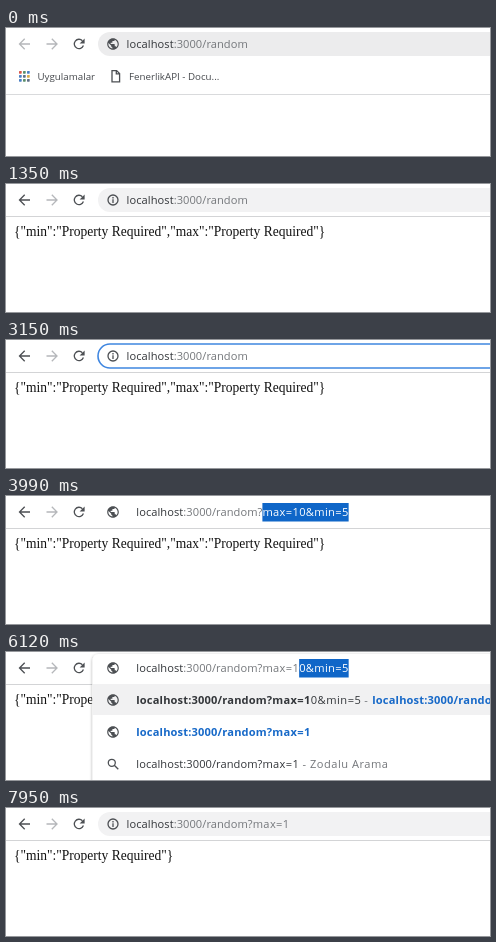
An HTML page for the animation above (8 s loop, 484 by 128 pixels).

```html
<!DOCTYPE html>
<html lang="tr">
<head>
<meta charset="utf-8">
<title>Address bar</title>
<style>
html, body { margin: 0; width: 100%; height: 100%; overflow: hidden; background: #fff; }
svg { display: block; }
text { white-space: pre; font: 11.1px "Open Sans", "Noto Sans", sans-serif; letter-spacing: .06px; fill: #33363a; }
.page { font: 13.52px "Liberation Serif", "Times New Roman", serif; letter-spacing: 0; fill: #111; }
.mark { font-size: 9.75px; letter-spacing: 0; fill: #44474b; }
.bold { font-weight: 700; letter-spacing: .16px; }
.query { letter-spacing: .35px; }
.rest { font-weight: 400; letter-spacing: .5px; }
.blue { fill: #1769c8; }
.grey { fill: #74777b; }
.line { fill: none; stroke: #4c4f53; stroke-width: 1.3; }
.off { stroke: #b5b7ba; }
.icon { fill: #4c4f53; }
</style>
</head>
<body>
<svg width="484" height="128" viewBox="0 0 484 128">
  <defs>
    <filter id="shadow" x="-5%" y="-10%" width="110%" height="120%">
      <feDropShadow dx="0" dy="1" stdDeviation="1.6" flood-color="#000" flood-opacity=".4"/>
    </filter>
    <path id="globe" class="icon" transform="scale(.58) translate(-12 -12)" d="M12 2C6.48 2 2 6.48 2 12s4.48 10 10 10 10-4.48 10-10S17.52 2 12 2zm-1 17.93c-3.95-.49-7-3.85-7-7.93 0-.62.08-1.21.21-1.79L9 15v1c0 1.1.9 2 2 2v1.93zm6.9-2.54c-.26-.81-1-1.39-1.9-1.39h-1v-3c0-.55-.45-1-1-1H8v-2h2c.55 0 1-.45 1-1V7h2c1.1 0 2-.9 2-2v-.41c2.93 1.19 5 4.06 5 7.41 0 2.08-.8 3.97-2.1 5.39z"/>
  </defs>
  <rect width="484" height="128" fill="#fff"/>

  <g id="bookmarks">
    <g id="apps"></g>
    <text class="mark" x="31.5" y="51.8">Uygulamalar</text>
    <path class="line" d="M106 42.6h4.6l3 3v8.3H106zM110.3 42.8v3.1h3.2"/>
    <text class="mark" x="123" y="51.8">FenerlikAPI - Docu...</text>
    <rect y="66" width="484" height="1" fill="#d9dadc"/>
  </g>

  <g id="loaded">
    <rect y="32" width="484" height="1" fill="#d3d4d6"/>
    <text id="body" class="page" x="8" y="52.4"></text>
  </g>

  <path id="back" class="line" d="M24 16H13.7M18.7 10.8l-5.2 5.2 5.2 5.2"/>
  <path class="line off" d="M40.5 16h10.3M45.8 10.8l5.2 5.2-5.2 5.2"/>
  <path class="line" d="M77.4 17.6A4.7 4.7 0 1 1 76.4 12.7"/>
  <path class="icon" d="M78.6 10.4v5h-5z"/>

  <rect id="pill" x="92" y="4" width="420" height="24" rx="12"/>

  <g id="menu">
    <rect x="86.5" y="2" width="430" height="150" rx="6" fill="#fff" filter="url(#shadow)"/>
    <rect x="86.5" y="32" width="400" height="31" fill="#f1f1f2"/>
    <use href="#globe" x="107" y="48"/>
    <use href="#globe" x="107" y="80"/>
    <g id="match">
      <text x="130.3" y="52"><tspan class="bold">localhost:3000/random?</tspan><tspan id="hit" class="bold query"></tspan><tspan id="miss" class="rest"></tspan></text>
      <text class="grey" x="358.3" y="52">-</text>
      <text class="bold blue" x="366.3" y="52">localhost:3000/random?max=10&amp;min=5</text>
    </g>
    <g id="typedRow">
      <text class="bold blue" x="130.3" y="84">localhost:3000/random?<tspan id="typedUrl" class="query"></tspan></text>
    </g>
    <circle class="line" cx="105.8" cy="110.8" r="3.5"/>
    <path class="line" d="M108.3 113.3l4 4"/>
    <text x="130.3" y="116">localhost:3000/random?<tspan id="search" class="query"></tspan><tspan class="grey rest"> - Zodalu Arama</tspan></text>
  </g>

  <use id="site" href="#globe" x="107" y="16"/>
  <g id="info">
    <circle class="line" cx="107" cy="16" r="5"/>
    <path class="line" d="M107 12.9v1.5M107 15.2v3.8"/>
  </g>

  <g id="address">
    <rect id="selection" y="7" height="18.5" fill="#0f66c8"/>
    <text id="url" y="20">localhost<tspan class="grey">:3000/random</tspan><tspan id="mark" class="grey"></tspan><tspan id="typed" class="grey query"></tspan><tspan id="picked" class="query" fill="#fff"></tspan></text>
    <rect id="caret" y="8" width="1" height="16" fill="#222"/>
  </g>
</svg>
<script>
const LOOP = 8000;
const BASE = "localhost:3000/random?";
const QUERY = "max=10&min=5";
const KEYS = [4830, 5400, 5460, 5700, 6090];
const T = { hoverEnd: 750, load: 1200, info: 1350, focus: 2550, ring: 2640, blinkOff: 3150, blinkOn: 3630,
            type: 3990, open: 4050, erase: 7020, enter: 7410, reload: 7440, done: 7500 };
const ERROR = '"Property Required"';

const $ = id => document.getElementById(id);
const show = (id, on) => $(id).setAttribute("display", on ? "inline" : "none");
const set = (id, attrs) => { for (const k in attrs) $(id).setAttribute(k, attrs[k]); };
const write = (id, s) => { if ($(id).textContent !== s) $(id).textContent = s; };

const dots = ["#d9574a", "#5b8f6b", "#4a7fc4", "#4a7fc4", "#5f6f86", "#d9ab45", "#4a7fc4", "#5b8f6b", "#5f6f86"];
$("apps").innerHTML = dots.map((c, i) =>
  `<rect x="${13 + i % 3 * 4}" y="${43 + Math.floor(i / 3) * 4}" width="2.7" height="2.7" rx=".6" fill="${c}"/>`).join("");

function drawPage(t) {
  const loaded = t >= T.load;
  show("bookmarks", !loaded);
  show("loaded", loaded);
  set("back", { class: loaded ? "line" : "line off" });
  write("body", t < T.reload ? `{"min":${ERROR},"max":${ERROR}}` : `{"min":${ERROR}}`);
}

function drawPill(t, editing) {
  const focused = t >= T.focus && t < T.type;
  set("pill", {
    fill: focused || editing ? "#fff" : t < T.hoverEnd ? "#ececed" : "#f2f2f3",
    stroke: focused ? "#3f86e0" : "none",
    "stroke-width": 1.6,
    "stroke-opacity": t < T.ring ? .6 : 1
  });
  const info = (t >= T.info && t < T.type) || t >= T.done;
  show("info", info);
  show("site", !info);
}

function drawAddress(t, editing, typed, rest) {
  const asked = t >= T.type;
  set("address", { transform: `translate(${editing ? 130.3 : 120.6} 0)` });
  write("mark", asked ? "?" : "");
  write("typed", asked ? typed : "");
  write("picked", asked ? rest : "");

  const url = $("url");
  const end = url.getEndPositionOfChar(url.textContent.length - 1).x;
  const selecting = editing && rest !== "";
  show("selection", selecting);
  if (selecting) {
    const from = url.getStartPositionOfChar(BASE.length + typed.length).x;
    set("selection", { x: from, width: end - from });
  }

  const waiting = t >= T.focus && t < T.type && !(t >= T.blinkOff && t < T.blinkOn);
  const erased = editing && rest === "";
  show("caret", waiting || erased);
  set("caret", { x: end });
}

function drawMenu(t, typed) {
  const open = t >= T.open && t < T.enter;
  show("menu", open);
  if (!open) return;
  write("hit", typed);
  write("miss", QUERY.slice(typed.length));
  write("typedUrl", typed);
  write("search", typed);
  // The typed address takes the first row once the suggestion is erased.
  const step = t >= T.erase ? 32 : 0;
  set("match", { transform: `translate(0 ${step})` });
  set("typedRow", { transform: `translate(0 ${-step})` });
}

function draw(t) {
  const editing = t >= T.type && t < T.enter;
  const count = KEYS.filter(k => t >= k).length;
  const typed = QUERY.slice(0, count);
  const rest = t < T.erase ? QUERY.slice(count) : "";
  drawPage(t);
  drawPill(t, editing);
  drawMenu(t, typed);
  drawAddress(t, editing, typed, rest);
}

const start = performance.now();
function tick() {
  draw((performance.now() - start) % LOOP);
  requestAnimationFrame(tick);
}
tick();
</script>
</body>
</html>
```
